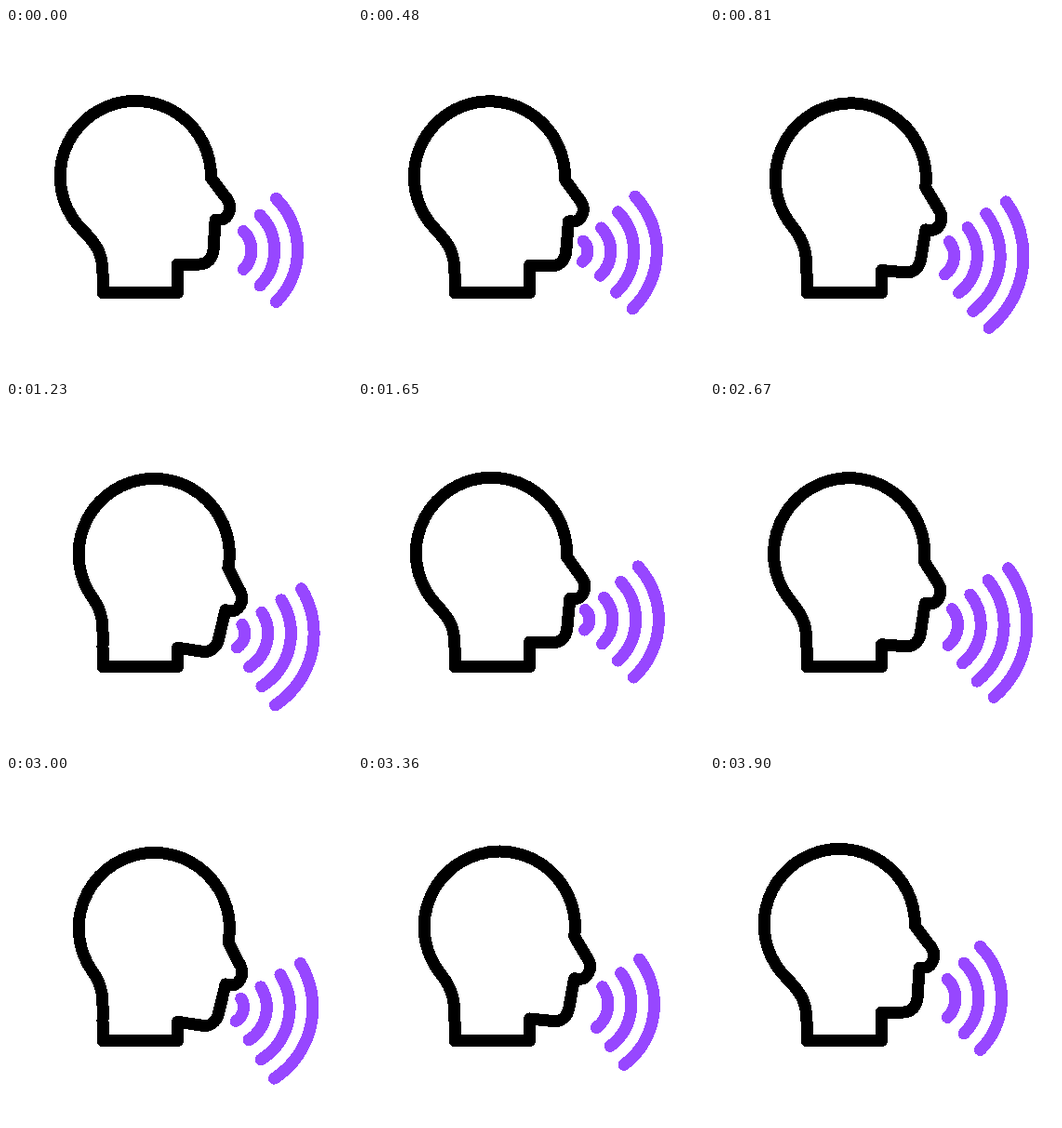
An HTML page that plays this animation: 372x372 px, repeating every 4.5 s.

```html
<!DOCTYPE html>
<html lang="en">
<head>
<meta charset="utf-8">
<title>Talking head</title>
<style>
html, body { margin: 0; width: 100%; height: 100%; overflow: hidden; background: #fff; }
svg { display: block; width: 100%; height: 100%; }
path { fill: none; stroke-width: 13; stroke-linecap: round; stroke-linejoin: round; shape-rendering: crispEdges; }
#head { stroke: #000; }
#waves { stroke: #9747ff; }
</style>
</head>
<body>
<svg viewBox="0 0 372 372">
  <path id="head"/>
  <path id="waves"/>
</svg>
<script>
const LOOP = 4500, STEP = 30, START = 300, END = 3900;
const SWING = 900, PULSE = 600;
const RAD = Math.PI / 180;
const SKULL = { x: 139.3, y: 159.5, r: 81.1 };

// Lean at each swing: 0 rest, 1 forward, 2 back
const LEANS = [0, 1, 2, 1, 0];
const POSES = [
  { x: 0, y: 0, turn: 0, wx: 235, wy: 239, tilt: 0 },
  { x: 20, y: 4, turn: 0.17, wx: 239, wy: 248.9, tilt: 12.8 },
  { x: -11.8, y: 1.7, turn: -0.111, wx: 238.4, wy: 219.3, tilt: -8.3 }
];

const head = document.getElementById('head');
const waves = document.getElementById('waves');
const pt = (x, y) => x.toFixed(2) + ' ' + y.toFixed(2);

function poseAt(t) {
  const i = Math.min(3, Math.floor(t / SWING));
  const u = t / SWING - i;
  const s = u * u * (3 - 2 * u);
  const a = POSES[LEANS[i]], b = POSES[LEANS[i + 1]];
  const pose = {};
  for (const key in a) pose[key] = a[key] + (b[key] - a[key]) * s;
  return pose;
}

function headPath(pose) {
  const c = Math.cos(pose.turn), s = Math.sin(pose.turn);
  const spot = (x, y) => {
    const dx = x - SKULL.x, dy = y - SKULL.y;
    return [SKULL.x + pose.x + dx * c - dy * s, SKULL.y + pose.y + dx * s + dy * c];
  };
  const p = (x, y) => pt(...spot(x, y));
  const d = SKULL.r * Math.SQRT1_2;
  const nape = p(SKULL.x - d, SKULL.y + d);
  const jaw = spot(184.5, 254)[1];
  return `M104 284.7 V264 C104 243 ${p(98, 233)} ${nape}` +
    ` A${SKULL.r} ${SKULL.r} 0 1 1 ${p(220.4, 161)}` +
    ` L${p(238, 184.3)} C${p(244, 193)} ${p(239.2, 206)} ${p(230.5, 206)} L${p(225.2, 206)}` +
    ` L${p(223, 239)} C${p(222, 248)} ${p(216, 254)} ${p(208, 254)}` +
    ` L${pt(184.5, jaw)} V284.7 Z`;
}

function wavePath(pose, phase) {
  let path = '';
  for (let k = 0; k < 4; k++) {
    const reach = 4.1 + 24.8 * (k + phase);
    if (reach < 7.8) continue;
    // Newborn waves are flatter than their reach
    const young = Math.max(0, 18 - reach);
    const r = reach + 0.45 * young;
    const half = 45 + 0.8 * young - 0.1 * Math.max(0, reach - 83);
    const tilt = pose.tilt * RAD;
    const x = pose.wx + (reach - r) * Math.cos(tilt);
    const y = pose.wy + (reach - r) * Math.sin(tilt);
    const end = sign => {
      const a = tilt + sign * half * RAD;
      return pt(x + r * Math.cos(a), y + r * Math.sin(a));
    };
    path += `M${end(-1)} A${r} ${r} 0 0 1 ${end(1)}`;
  }
  return path;
}

function draw(now) {
  const tick = Math.floor((now % LOOP) / STEP) * STEP;
  const t = Math.min(END, Math.max(START, tick)) - START;
  const pose = poseAt(t);
  head.setAttribute('d', headPath(pose));
  waves.setAttribute('d', wavePath(pose, (t % PULSE) / PULSE));
}

function frame(now) {
  draw(now);
  requestAnimationFrame(frame);
}
draw(0);
requestAnimationFrame(frame);
</script>
</body>
</html>
```
